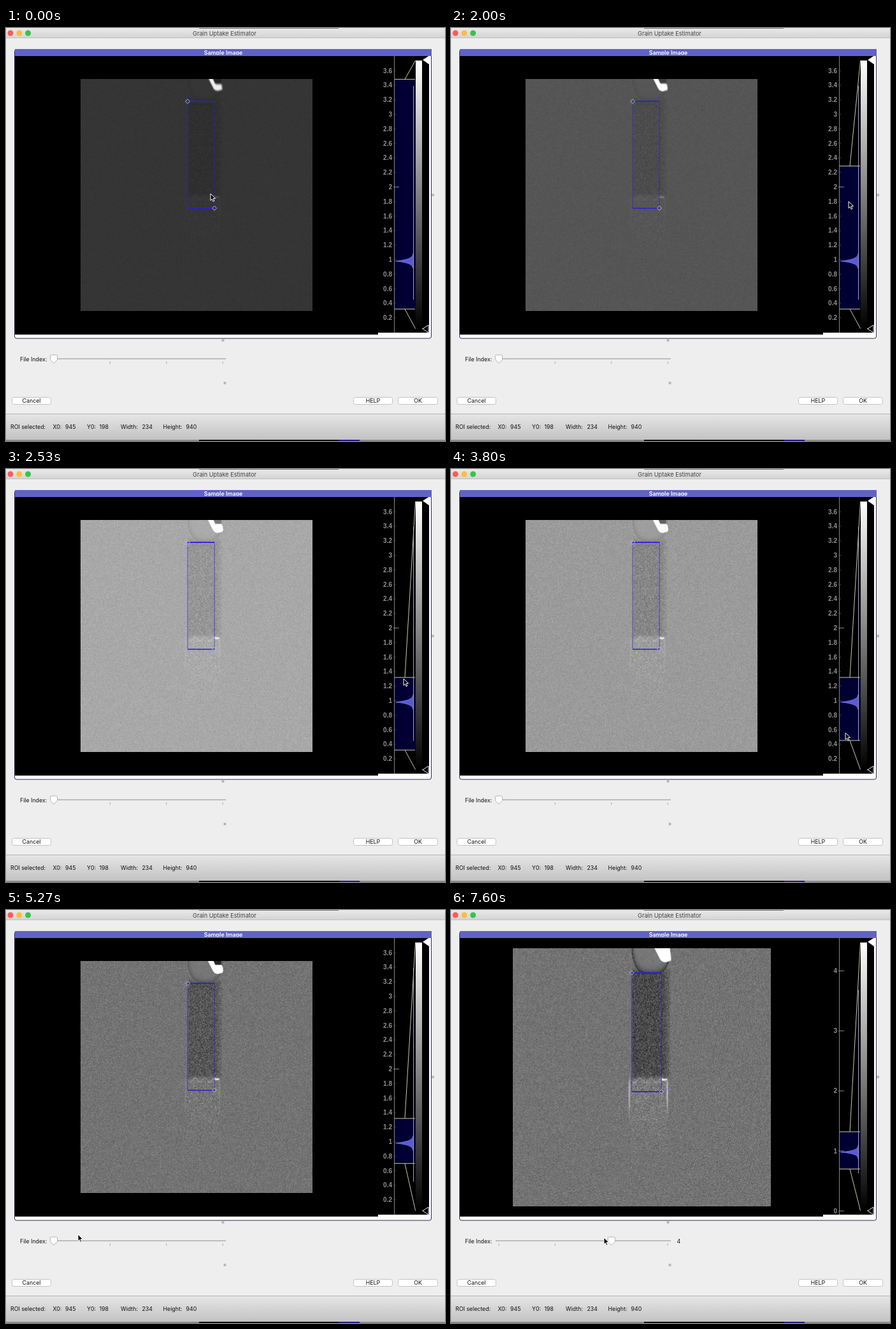
Animation, 689 px wide and 648 px high, one loop 8 s. Source, as an HTML page with a canvas:

```html
<!DOCTYPE html>
<html lang="en">
<head>
<meta charset="utf-8">
<title>Grain Uptake Estimator</title>
<style>
html, body { margin: 0; width: 100%; height: 100%; overflow: hidden; background: #eee; }
canvas { display: block; }
</style>
</head>
<body>
<canvas id="stage" width="689" height="648"></canvas>
<script>
const LOOP = 8000, SIZE = 405;
const ctx = document.getElementById('stage').getContext('2d');
const UI = 'Inter, "Liberation Sans", sans-serif';
const AXIS = '"Liberation Sans", sans-serif';

// time, x, y, eased
const CURSOR = [
  [130, 321, 260], [930, 627, 84, 1], [1400, 627, 84], [2000, 624, 272], [2200, 624, 312],
  [2270, 624, 313], [2530, 624, 329], [2650, 624, 330], [3070, 619, 437, 1], [3200, 619, 437],
  [3330, 619, 440], [3530, 619, 440], [3800, 619, 414], [4330, 620, 392], [4500, 620, 390],
  [5200, 121, 509, 1], [5270, 113, 509], [5600, 79, 515, 1], [5800, 79, 515],
  [6470, 155, 515, 1], [7000, 155, 515], [7600, 240, 514, 1]
];
// Histogram levels: time, value
const HIGH = [[1400, 3.483], [2000, 2.292], [2200, 1.63], [2270, 1.55], [2530, 1.32]];
const LOW = [[3530, .32], [3800, .452], [4330, .69], [4470, .7]];

const clamp = (x, a = 0, b = 1) => Math.min(b, Math.max(a, x));
const smooth = (a, b, x) => { const p = clamp((x - a) / (b - a)); return p * p * (3 - 2 * p); };

function track(keys, t, col = 1) {
  if (t <= keys[0][0]) return keys[0][col];
  for (let i = 1; i < keys.length; i++) {
    const a = keys[i - 1], b = keys[i];
    if (t < b[0]) {
      const p = b[3] ? smooth(a[0], b[0], t) : (t - a[0]) / (b[0] - a[0]);
      return a[col] + (b[col] - a[col]) * p;
    }
  }
  return keys[keys.length - 1][col];
}

function random(seed) {
  return () => {
    seed = (seed + 0x6D2B79F5) | 0;
    let r = Math.imul(seed ^ seed >>> 15, 1 | seed);
    r ^= r + Math.imul(r ^ r >>> 7, 61 | r);
    return ((r ^ r >>> 14) >>> 0) / 4294967296;
  };
}

// Transmission of the sample at u, v in 0..1; n is noise, k the progress of the scan
function sample(u, v, n, k) {
  const across = smooth(.457, .466, u) * (1 - smooth(.575, .615, u) * .7) * (1 - smooth(.603, .613, u));
  const wet = across * smooth(.065, .1, v) * (1 - smooth(.485, .515, v));
  let value = .98 + n * (1 + wet * .9) - wet * (.07 + .03 * k);

  const below = smooth(.45, .46, u) * (1 - smooth(.59, .602, u)) * smooth(.5, .52, v);
  value += below * (.008 + .01 * k + n * .6) * (1 - smooth(.55, .85, v));

  const wall = Math.max(0, 1 - Math.abs(u - .451) / .005) + Math.max(0, 1 - Math.abs(u - .598) / .005);
  value += wall * (.06 + .14 * k) * smooth(.49, .53, v) * (1 - smooth(.56, .68, v));

  // Uneven liquid front with a bright reflex on the right
  const front = .511 + .009 * Math.sin(u * 150);
  if (u > .46 && u < .595) value += .08 * Math.max(0, 1 - Math.abs(v - front) / .005);
  if (u > .575 && u < .596) value += .35 * Math.max(0, 1 - Math.abs(v - .508) / .006);

  const q = Math.abs((u - .536) / .076) ** 3 + (v / (.091 + .009 * k)) ** 2;
  if (q < 1) value = .99 + n * .5 - (.08 + .1 * k) * q ** 4;

  let tip = smooth(-.004, .006, u - .551 - .5 * v) * smooth(-.004, .008, .607 + .1 * v - u);
  tip *= 1 - smooth(.042, .057, v + Math.abs(u - .59) * .25);
  if (k < .3) {
    const notch = smooth(.566, .574, u - .45 * v) * (1 - smooth(.012, .03, v));
    tip *= 1 - notch;
    value -= .2 * notch * smooth(.61, .6, u) * (u < .605);
  }
  return value + 2.3 * tip;
}

const fields = {};
function field(index) {
  if (fields[index]) return fields[index];
  const rnd = random(71 + index), data = new Float32Array(SIZE * SIZE);
  for (let i = 0; i < data.length; i++) {
    const n = (rnd() + rnd() + rnd() - 1.5) * .056;
    data[i] = sample((i % SIZE) / SIZE, Math.floor(i / SIZE) / SIZE, n, index / 4);
  }
  return fields[index] = data;
}

const scan = document.createElement('canvas');
scan.width = scan.height = SIZE;
const scanCtx = scan.getContext('2d');
const pixels = scanCtx.createImageData(SIZE, SIZE);
let scanKey = '';
function renderScan(index, low, high) {
  const key = [index, low, high].join();
  if (key === scanKey) return;
  scanKey = key;
  const data = field(index), gain = 255 / (high - low);
  for (let i = 0, p = 0; i < data.length; i++) {
    const g = (data[i] - low) * gain;
    pixels.data[p++] = g;
    pixels.data[p++] = g;
    pixels.data[p++] = g;
    pixels.data[p++] = 255;
  }
  scanCtx.putImageData(pixels, 0, 0);
}

function rect(x, y, w, h, fill) {
  ctx.fillStyle = fill;
  ctx.fillRect(x, y, w, h);
}
function path(points, stroke, fill, width = 1, close = false) {
  ctx.beginPath();
  points.forEach(([x, y]) => ctx.lineTo(x, y));
  if (close) ctx.closePath();
  if (fill) { ctx.fillStyle = fill; ctx.fill(); }
  if (stroke) { ctx.strokeStyle = stroke; ctx.lineWidth = width; ctx.stroke(); }
}
function roundBox(x, y, w, h, stroke, fill) {
  ctx.beginPath();
  ctx.roundRect(x, y, w, h, 3);
  ctx.fillStyle = fill;
  ctx.fill();
  ctx.strokeStyle = stroke;
  ctx.lineWidth = 1;
  ctx.stroke();
}
function dot(x, y, r, fill) {
  ctx.beginPath();
  ctx.arc(x, y, r, 0, 7);
  ctx.fillStyle = fill;
  ctx.fill();
}
function text(str, x, y, { size = 8.8, color = '#111', align = 'left', font = UI, weight = 400 } = {}) {
  ctx.font = `${weight} ${size}px ${font}`;
  ctx.textAlign = align;
  ctx.fillStyle = color;
  ctx.fillText(str, x, y);
}
function shade(y, h, from, to) {
  const g = ctx.createLinearGradient(0, y, 0, y + h);
  g.addColorStop(0, from);
  g.addColorStop(1, to);
  return g;
}
function button(label, x, w) {
  roundBox(x + .5, 579.5, w - 1, 11, '#c3c3c3', '#fff');
  text(label, x + w / 2, 588, { align: 'center' });
}

function drawWindow() {
  rect(0, 0, 689, 648, '#eeeeee');
  rect(0, 0, 689, 16, shade(0, 16, '#e9e9e9', '#d3d3d3'));
  rect(0, 15, 689, 1, '#c0c0c0');
  rect(303, 0, 219, 1, '#777');
  ['#fc5b57', '#fdbc40', '#34c648'].forEach((c, i) => dot(7 + i * 13.8, 8, 4.5, c));
  text('Grain Uptake Estimator', 343, 11.5, { size: 9.2, color: '#444', align: 'center' });

  roundBox(13.5, 33.5, 654, 453.5, '#2c2c55', '#fff');
  rect(14, 33, 654, 11, '#6062c8');
  ctx.save();
  ctx.beginPath();
  ctx.rect(14, 33, 654, 9);
  ctx.clip();
  text('Sample Image', 341, 41.5, { size: 8.9, color: '#fff', align: 'center', weight: 600 });
  ctx.restore();
  rect(14, 44, 570, 437, '#000');
  rect(584, 44, 80, 434, '#000');

  dot(340.5, 490, 2.2, '#b8b8b8');
  dot(343.5, 557, 2.2, '#b8b8b8');
  dot(670, 262, 2.2, '#b8b8b8');
  button('Cancel', 9, 62);
  button('HELP', 545, 62);
  button('OK', 615, 63);

  rect(0, 605, 689, 43, shade(605, 42, '#e6e6e6', '#c2c2c2'));
  rect(0, 605, 689, 1, '#b0b0c0');
  rect(0, 646, 689, 2, '#8c8c8c');
  rect(303, 646, 220, 2, '#111');
  rect(523, 646, 32, 2, '#2f168c');
  [['ROI selected:', 7], ['X0:', 73.5], ['945', 93], ['Y0:', 127], ['198', 146.5],
   ['Width:', 180], ['234', 213.5], ['Height:', 246.5], ['940', 282.5]]
    .forEach(([s, x]) => text(s, x, 629));
}

function drawScan(index, low, high) {
  const [x, y, s] = index ? [96.5, 59.5, 405.5] : [117, 80, 364.2];
  renderScan(index, low, high);
  ctx.drawImage(scan, x, y, s, s);
  const l = x + .4615 * s, r = x + .577 * s, t = y + .0965 * s, b = y + .5565 * s;
  const strong = '#2a1ce0', side = 'rgba(48,32,215,.65)';
  path([[l, t], [l, b]], side);
  path([[r, t], [r, b]], side);
  path([[l, t], [r, t]], strong, null, 1.6);
  path([[l, b], [r, b]], strong, null, 1.6);
  for (const [cx, cy] of [[l, t], [r, b]])
    path([[cx - 3.5, cy], [cx, cy - 3.5], [cx + 3.5, cy], [cx, cy + 3.5]], '#b4b4d8', null, 1, true);
}

function drawHistogram(index, low, high, hover) {
  const zero = index ? 472.3 : 477.5, unit = index ? 94.2 : 114;
  const at = v => zero - v * unit;
  const top = at(high), bottom = at(low), edge = '#c9c9b0';

  rect(610, top, 33, bottom - top, hover ? '#000064' : '#000032');
  path([[609.5, 44], [609.5, 478]], '#858585');
  const step = index ? 1 : .2, last = index ? 4 : 18;
  for (let i = index ? 0 : 1; i <= last; i++) {
    const v = i * step, y = at(v);
    text(String(+v.toFixed(1)), 606, y + 3.5,
      { size: 10, color: '#909090', align: 'right', font: AXIS, weight: 700 });
    const major = index || i === 10;
    path([[608, y], [major ? 617 : 612, y]], major ? '#858585' : '#4a4a4a');
  }

  // Counts grow leftwards from the baseline
  const base = 639.5, peak = at(.98), spread = unit * .027;
  const count = d => 28 * Math.exp(-Math.abs(d) / spread);
  const curve = [];
  for (let d = -12; d <= 12; d += .5) curve.push([base - count(d), peak + d]);
  path(curve, '#8a8af0', '#5a5ad8', .7);
  path([[base, at(index ? 3.68 : 3.39)], [base, at(index ? .63 : .45)]], '#a0a0c8');

  path([[610, top], [642, top]], edge);
  path([[610, bottom], [642, bottom]], edge);
  path([[626, top], [642.5, 51]], edge);
  path([[626, bottom], [642.5, 471.5], [654, 471.5]], edge);
  rect(643, 51, 10, 421, shade(51, 421, '#fff', '#000'));
  path([[654, 50], [664, 43.5], [664, 57]], null, '#fff');
  path([[654, 472], [663, 466], [663, 478]], '#e8e8e8', '#000', 1, true);
}

function drawSlider(index) {
  text('File Index:', 22, 523.3);
  rect(70, 518, 275, 2, '#bdbdbd');
  for (let i = 0; i < 4; i++)
    if (i * 2 !== index) rect(74.5 + i * 88.4, 523, 1, 4, '#b0b0b0');
  const x = 75 + index * 44.2;
  path([[x - 5.5, 514], [x - 4.5, 513], [x + 4.5, 513], [x + 5.5, 514], [x + 5.5, 520.5], [x, 526], [x - 5.5, 520.5]],
    '#b4b4b4', '#fff', 1, true);
  if (index) text(String(index), 354.5, 523.3);
}

function drawCursor(x, y) {
  const shape = [[0, 0], [0, 10.5], [2.4, 8.3], [4.1, 12.2], [5.9, 11.4], [4.2, 7.6], [7.5, 7.4]];
  path(shape.map(([dx, dy]) => [x + dx, y + dy]), '#fff', '#000', 1, true);
}

function draw(t) {
  const x = track(CURSOR, t), y = track(CURSOR, t, 2);
  const low = track(LOW, t), high = track(HIGH, t);
  const index = t < 5800 ? 0 : Math.round((x - 75) / 44.2);
  const hover = (t > 880 && t < 1200) || (t > 2660 && t < 3000);
  drawWindow();
  drawScan(index, low, high);
  drawHistogram(index, low, high, hover);
  drawSlider(index);
  drawCursor(x, y);
}

for (let i = 0; i <= 4; i++) field(i);
const start = performance.now();
function tick() {
  draw((performance.now() - start) % LOOP);
  requestAnimationFrame(tick);
}
tick();
</script>
</body>
</html>
```
